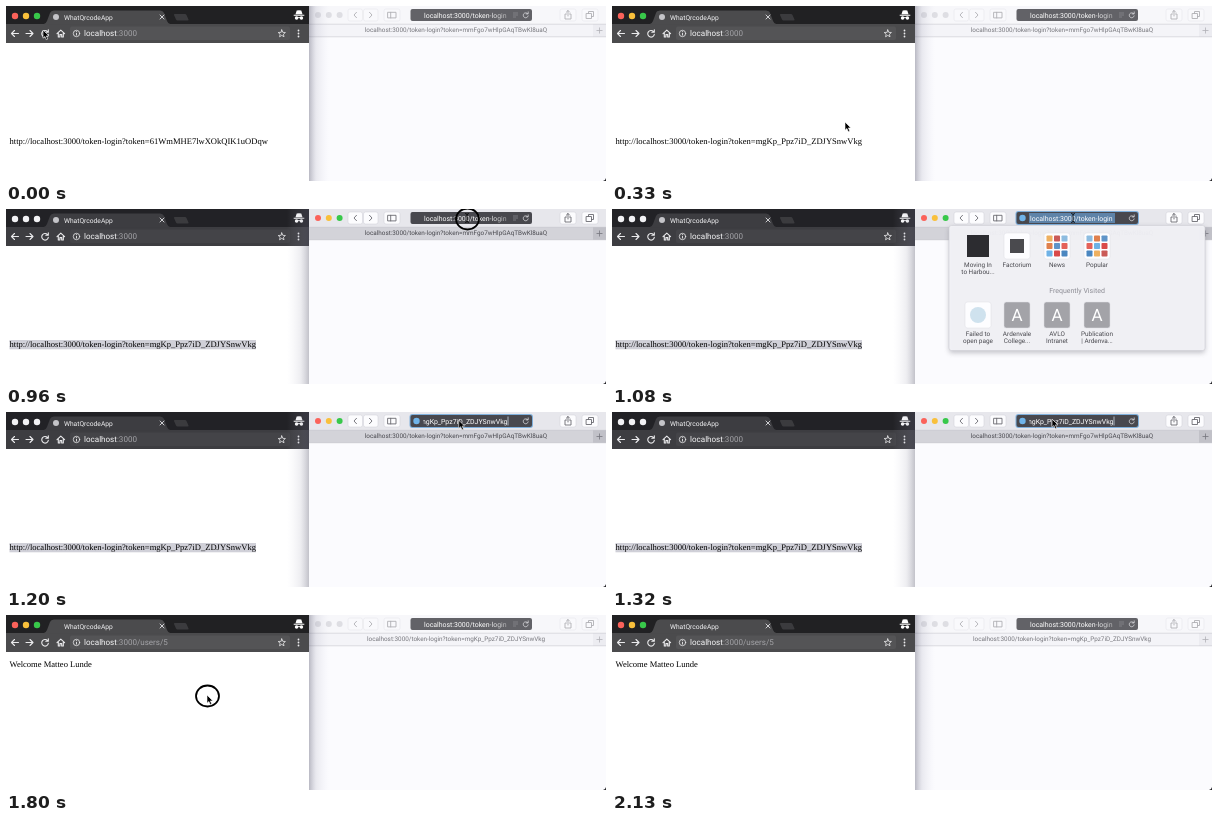
Recreate the animation shown at these times as an HTML page. Size 600 px wide and 175 px high, loop 2.16 s.

```html
<!DOCTYPE html>
<html lang="en">
<head>
<meta charset="utf-8">
<title>Token login</title>
<style>
  html, body { margin: 0; width: 100%; height: 100%; overflow: hidden; background: #fff; }
  svg { display: block; width: 600px; height: 175px; }
  text { font-family: Roboto, "Liberation Sans", sans-serif; text-rendering: geometricPrecision; white-space: pre; }
  .page { font: 8.55px "Liberation Serif", "Times New Roman", serif; fill: #000; }
  .mid { text-anchor: middle; }
  .line { fill: none; stroke-linecap: round; stroke-linejoin: round; }

  /* the left window is active unless the stage has the class "right" */
  #strip { fill: #212123; }
  #tools, #tab { fill: #4b4b4d; }
  #omni { fill: #545456; }
  #bar { fill: #f7f7fa; }
  #tabs { fill: #f4f4f8; }
  #plusCell { fill: #ececf1; }
  #rightUi { opacity: .5; }
  #rightLights circle { fill: #dedee3; }
  #tabTitle { fill: #77777d; }
  #field { fill: #626267; }
  #selection { fill: #b4d5fb; }
  .right #strip { fill: #222226; }
  .right #tools, .right #tab { fill: #3d3d41; }
  .right #omni { fill: #444448; }
  .right #leftLights circle { fill: #f2f2f5; }
  .right #bar { fill: #e7e7ec; }
  .right #tabs { fill: #d3d3d9; }
  .right #plusCell { fill: #c1c1c8; }
  .right #rightUi { opacity: 1; }
  .right #tabTitle { fill: #48484e; }
  .right #field { fill: #48484e; }
  .right #selection { fill: #d0d0d8; }
  .right #rightLights circle:nth-child(1), svg:not(.right) #leftLights circle:nth-child(1) { fill: #fb625a; }
  .right #rightLights circle:nth-child(2), svg:not(.right) #leftLights circle:nth-child(2) { fill: #f9c03b; }
  .right #rightLights circle:nth-child(3), svg:not(.right) #leftLights circle:nth-child(3) { fill: #38c84a; }
</style>
</head>
<body>
<svg id="stage" viewBox="0 0 600 175">
  <defs>
    <linearGradient id="shadeR"><stop offset="0" stop-color="#55556a" stop-opacity=".4"/><stop offset=".35" stop-color="#8888a0" stop-opacity=".16"/><stop offset="1" stop-color="#c0c0d8" stop-opacity="0"/></linearGradient>
    <linearGradient id="shadeL" x1="1" x2="0"><stop offset="0" stop-color="#55556a" stop-opacity=".36"/><stop offset=".4" stop-color="#8888a0" stop-opacity=".14"/><stop offset="1" stop-color="#c0c0d8" stop-opacity="0"/></linearGradient>
    <linearGradient id="fade" gradientUnits="userSpaceOnUse" x1="482" x2="506" y1="0" y2="0"><stop offset="0" stop-color="#fff"/><stop offset="1" stop-color="#fff" stop-opacity=".35"/></linearGradient>
    <clipPath id="fieldClip"><rect x="417" y="2" width="86" height="14"/></clipPath>
    <filter id="soft" x="-10%" y="-10%" width="120%" height="125%"><feGaussianBlur stdDeviation="2.500"/></filter>
  </defs>

  <g id="leftWindow">
    <rect width="303" height="175" fill="#fff"/>
    <rect id="strip" width="303" height="19"/>
    <rect id="tools" y="18" width="303" height="19"/>
    <path id="tab" d="M37 18.500Q40 18 41 15L44 7Q45 4.500 48 4.500H154Q157 4.500 158 7L161 15Q162 18 165 18.500Z"/>
    <path d="M169 8h10q1 0 1.500 1l2 4.500q.5 1-1 1h-10q-1 0-1.500-1l-2-4.500q-.4-1 1-1z" fill="#3b3b3e"/>
    <g id="leftLights"><circle cx="9" cy="10" r="3.200"/><circle cx="20" cy="10" r="3.200"/><circle cx="31" cy="10" r="3.200"/></g>
    <circle id="favicon" cx="50" cy="11" r="3" fill="#c4c4c8"/>
    <text x="58" y="13.500" font-size="6.700" fill="#f4f4f6">WhatQrcodeApp</text>
    <path class="line" d="M154 9l4 4m0-4l-4 4" stroke="#dedee1" stroke-width=".9"/>
    <g fill="#fff">
      <path d="M289.500 8.200l1.200-3.700q2.300-.7 4.600 0l1.200 3.700zM287.700 8.700h10.600v1h-10.600z"/>
      <circle cx="290.600" cy="12" r="1.800"/><circle cx="295.400" cy="12" r="1.800"/><path d="M290 11.200h6v.8h-6z"/>
    </g>
    <rect id="omni" x="64" y="20.500" width="220" height="13.500" rx="2"/>
    <g class="line" stroke="#ebebed" stroke-width="1.100">
      <path d="M12.500 27.500h-7m3-3l-3 3 3 3"/>
      <path d="M20 27.500h7m-3-3l3 3-3 3"/>
      <path d="M41.500 25.600a3.300 3.300 0 1 0 .8 2.800M42.300 23.800v2.500h-2.500"/>
      <path d="M51 27.700l3.800-3.500 3.800 3.500M52.300 27.300v3.700h1.600v-2.400h1.800V31h1.600v-3.700"/>
      <circle cx="70.500" cy="27.500" r="3.200" stroke-width=".8"/><path d="M70.500 27.300v1.800m0-3.500v.1" stroke-width=".9"/>
      <path id="star" stroke-width=".8"/>
    </g>
    <g fill="#ebebed"><circle cx="292.500" cy="24.500" r=".9"/><circle cx="292.500" cy="27.500" r=".9"/><circle cx="292.500" cy="30.500" r=".9"/></g>
    <text x="78" y="30.300" font-size="8.050" fill="#f7f7f8">localhost<tspan id="path" fill="#a4a4a8"></tspan></text>
    <rect id="selection" x="3.500" y="131" height="9.300"/>
    <text id="body" class="page" x="3.500"></text>
    <rect id="leftShade" x="281" width="22" height="175" fill="url(#shadeL)"/>
  </g>

  <g id="rightWindow">
    <rect x="303" width="297" height="175" fill="#fbfbfe"/>
    <rect id="bar" x="303" width="297" height="18"/>
    <rect id="tabs" x="303" y="18" width="297" height="13"/>
    <rect id="plusCell" x="587" y="18" width="13" height="13"/>
    <path d="M303 18.200h297M303 30.800h297" stroke="#c8c8cf" stroke-width=".6"/>
    <g id="rightLights"><circle cx="312" cy="9" r="3"/><circle cx="322.800" cy="9" r="3"/><circle cx="333.600" cy="9" r="3"/></g>
    <g id="rightUi">
      <g fill="#fcfcfe" stroke="#cfcfd6" stroke-width=".5">
        <rect x="342" y="3" width="14.500" height="12" rx="2"/><rect x="357.500" y="3" width="14.500" height="12" rx="2"/>
        <rect x="378" y="3" width="16" height="12" rx="2"/>
        <rect x="554" y="3" width="16" height="12" rx="2"/><rect x="576" y="3" width="16" height="12" rx="2"/>
      </g>
      <g class="line" stroke="#6b6b72" stroke-width=".9">
        <path d="M350.500 6.300L348 9l2.500 2.700M363.500 6.300L366 9l-2.500 2.700"/>
        <path d="M382 6.300h8v5.600h-8zM384.700 6.300v5.600"/>
        <path d="M560.500 8h-1.500v5h6V8h-1.500M562 10V4.500m-1.700 1.700l1.700-1.700 1.700 1.700"/>
        <path d="M580.500 7.500h5v5h-5zM582.500 7.500v-2h5v5h-2"/>
      </g>
      <path d="M593.500 21.500v6m-3-3h6" stroke="#77777e" stroke-width=".8"/>
    </g>
    <text id="tabTitle" class="mid" x="450" y="26.400" font-size="6.350"></text>
    <rect id="focus" x="403.500" y="2" width="123.500" height="14" rx="3" fill="#7fb0dc"/>
    <rect id="field" x="404.500" y="3" width="121.500" height="12" rx="2"/>
    <rect id="urlMark" x="417" y="4" width="86" height="10" fill="#5e83a8"/>
    <circle id="siteIcon" cx="410.500" cy="9" r="3.200" fill="#6fb4ea"/>
    <g clip-path="url(#fieldClip)"><text id="url" y="11.500" font-size="6.950"></text></g>
    <path id="caret" d="M502 4.500v9" stroke="#dbe8f4" stroke-width=".7"/>
    <path class="line" d="M521.700 7.700a2.500 2.500 0 1 0 .5 2.200M522.200 5.900v2h-2" stroke="#d8d8dc" stroke-width=".8"/>
    <path id="reader" d="M507 7h5m-5 2h5m-5 2h3" stroke="#8e8e94" stroke-width=".7"/>
    <rect id="rightShade" x="303" width="20" height="175" fill="url(#shadeR)"/>

    <g id="popover">
      <rect x="337" y="18" width="256" height="126" rx="3" fill="#70707c" opacity=".4" filter="url(#soft)"/>
      <rect x="337" y="16.500" width="256" height="125" rx="2.500" fill="#f3f3f7" fill-opacity=".95" stroke="#cfcfd6" stroke-width=".6"/>
      <text class="mid" x="465" y="84" font-size="7" fill="#8c8c94">Frequently Visited</text>
      <g id="sites"></g>
    </g>
  </g>
  <path d="M600 172v3h-3q2.500-.5 3-3z" fill="#222226"/>

  <ellipse id="ring" rx="11.500" ry="10.500" fill="none" stroke="#000" stroke-width="1.800"/>
  <path id="arrow" d="M0 0v8.200l1.900-1.700 1.400 3.200 1.500-.7-1.400-3.100h2.500z" fill="#000" stroke="#fff" stroke-width=".6"/>
  <path id="beam" class="line" d="M-1.500-4.500q1.500 0 1.500 1.200v6.600q0 1.200-1.500 1.200M1.500-4.500q-1.500 0-1.500 1.200m0 6.600q0 1.200 1.500 1.200" stroke="#000" stroke-width=".8"/>
</svg>

<script>
const LOOP = 2160, STEP = 30;
const OLD = '61WmMHE7lwXOkQIK1uODqw', NEW = 'mgKp_Ppz7iD_ZDJYSnwVkg', PAST = 'mmFgo7wHlpGAqTBwKl8uaQ';
const LOGIN = 'localhost:3000/token-login';
const $ = id => document.getElementById(id);
const stage = $('stage');

function add(parent, tag, attrs, text = '') {
  const el = document.createElementNS('http://www.w3.org/2000/svg', tag);
  for (const key in attrs) el.setAttribute(key, attrs[key]);
  el.textContent = text;
  return parent.appendChild(el);
}

const set = (id, attrs) => { for (const key in attrs) $(id).setAttribute(key, attrs[key]); };
const show = (id, on) => { $(id).style.display = on ? '' : 'none'; };
const write = (id, text) => { if ($(id).textContent !== text) $(id).textContent = text; };

// five-pointed bookmark star
const points = Array.from({ length: 10 }, (_, i) => {
  const a = i * Math.PI / 5 - Math.PI / 2, r = i % 2 ? 1.7 : 3.8;
  return (275.8 + r * Math.cos(a)).toFixed(2) + ' ' + (27.7 + r * Math.sin(a)).toFixed(2);
});
set('star', { d: 'M' + points.join('L') + 'Z' });

const SITES = [
  ['dark', 'Moving In', 'to Harbou...'], ['mark', 'Factorium'], ['grid', 'News'], ['grid', 'Popular'],
  ['round', 'Failed to', 'open page'], ['A', 'Ardenvale', 'College...'], ['A', 'AVLO', 'Intranet'], ['A', 'Publication', '| Ardenva...']
];
const TILES = ['#e4625a', '#6fb2e6', '#d94a4a', '#4a86c0', '#eeb060', '#ca5a57', '#8dbce0', '#e0804d', '#5f94c8'];

SITES.forEach(([kind, ...lines], i) => {
  const g = $('sites'), x = [366, 405, 445, 485][i % 4], y = i < 4 ? 37 : 106;
  if (kind === 'dark') {
    add(g, 'rect', { x: x - 11, y: y - 11, width: 22, height: 22, fill: '#2c2c30' });
  } else {
    add(g, 'rect', { x: x - 13, y: y - 13, width: 26, height: 26, rx: 2.5, fill: kind === 'A' ? '#a3a3a8' : '#fdfdff', stroke: '#dcdce2', 'stroke-width': .5 });
  }
  if (kind === 'mark') add(g, 'rect', { x: x - 7, y: y - 7, width: 14, height: 14, fill: '#4a4a4e' });
  if (kind === 'round') add(g, 'circle', { cx: x, cy: y, r: 8, fill: '#cfe2ee' });
  if (kind === 'A') add(g, 'text', { class: 'mid', x, y: y + 6, 'font-size': 17, fill: '#fff' }, 'A');
  if (kind === 'grid') TILES.forEach((_, k) => add(g, 'rect', {
    x: x - 10.5 + k % 3 * 7.5, y: y - 10.5 + Math.floor(k / 3) * 7.5, width: 6, height: 6, rx: .8, fill: TILES[(k + i * 2) % 9]
  }));
  lines.forEach((line, k) => add(g, 'text', { class: 'mid', x, y: y + 20.5 + k * 7.7, 'font-size': 6.4, fill: '#48484e' }, line));
});

// pointer path: time, x, y
const PATH = [
  [0, 37, 24], [120, 37, 24], [330, 233, 116], [450, 250, 132], [510, 250, 132], [660, 5, 135],
  [780, 71, 118], [960, 461, 9], [1110, 461, 9], [1320, 440, 7], [1470, 440, 7], [1740, 201, 80],
  [1860, 201, 80], [2010, 215, 180], [LOOP, 215, 180]
];

function pointer(t) {
  const i = PATH.findIndex(p => p[0] > t);
  const [t0, x0, y0] = PATH[i - 1], [t1, x1, y1] = PATH[i];
  const u = (t - t0) / (t1 - t0), e = u * u * (3 - 2 * u);
  return [x0 + (x1 - x0) * e, y0 + (y1 - y0) * e];
}

function render(t) {
  const within = (a, b) => t >= a && t < b;
  const right = within(960, 1770), popover = within(990, 1170), pasted = within(1170, 1440);
  const done = t >= 1500, editing = popover || pasted;
  const [x, y] = pointer(t);

  stage.classList.toggle('right', right);
  show('leftShade', right);
  show('rightShade', !right);

  write('path', done ? ':3000/users/5' : ':3000');
  show('favicon', !done);
  write('body', done ? 'Welcome Matteo Lunde' : 'http://' + LOGIN + '?token=' + (t < 150 ? OLD : NEW));
  set('body', { y: done ? 52 : 138 });

  // dragging selects from the end of the line back to its start
  const from = within(510, 660) ? Math.max(3.5, Math.min(250, x)) : 3.5;
  set('selection', { x: from, width: 250 - from });
  show('selection', t >= 510 && !done);

  write('tabTitle', LOGIN + '?token=' + (t < 1440 ? PAST : NEW));
  write('url', pasted ? NEW : LOGIN);
  set('url', {
    x: pasted ? 501.5 : 418,
    'text-anchor': pasted ? 'end' : 'start',
    fill: editing ? '#fff' : 'url(#fade)'
  });
  show('focus', editing);
  show('urlMark', popover);
  show('siteIcon', editing);
  show('caret', pasted);
  show('reader', !editing);
  show('popover', popover);

  const beam = within(960, 1140), at = `translate(${x} ${y})`;
  set('arrow', { transform: at });
  set('beam', { transform: at });
  set('ring', { cx: x + .5, cy: y + 1 });
  show('arrow', !beam);
  show('beam', beam);
  show('ring', within(930, 990) || within(1740, 1860));
}

const start = performance.now();
function tick() {
  const t = Math.max(0, performance.now() - start) % LOOP;
  render(Math.floor(t / STEP) * STEP);
  requestAnimationFrame(tick);
}
tick();
</script>
</body>
</html>
```
